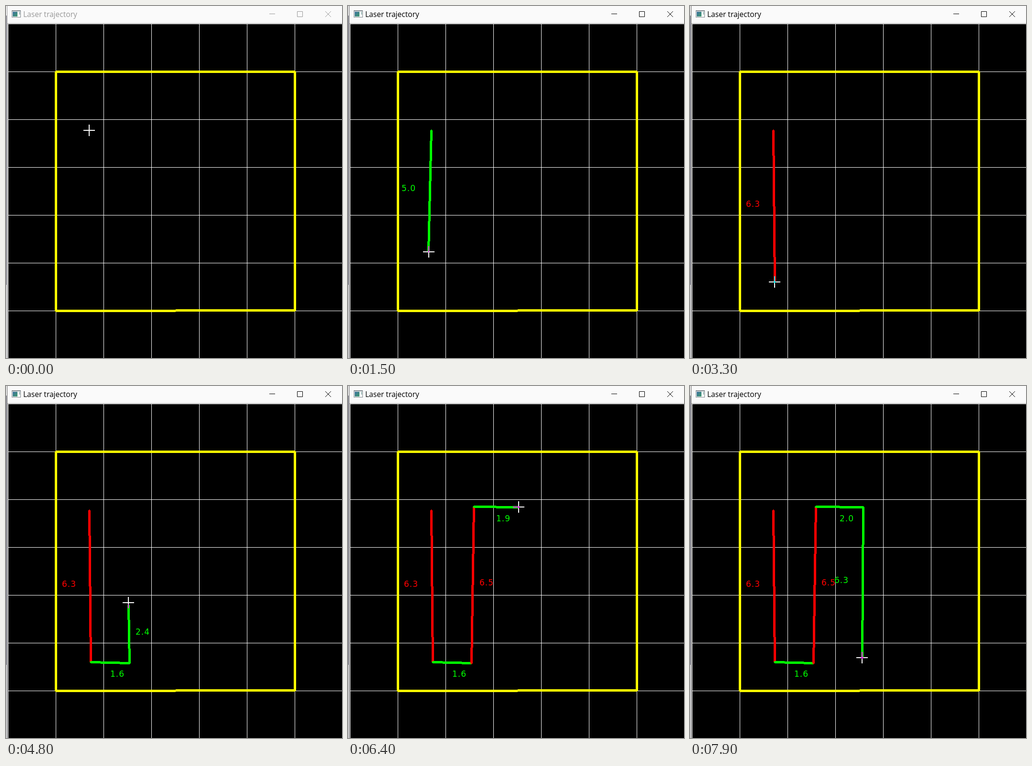
Recreate the animation shown at these times as an HTML page with a canvas. Size 703 px wide and 736 px high, loop 8 s.

```html
<!DOCTYPE html>
<html lang="en">
<head>
<meta charset="utf-8">
<title>Laser trajectory</title>
<style>
  html, body { margin: 0; width: 100%; height: 100%; overflow: hidden; background: #000; }
  canvas { display: block; }
</style>
</head>
<body>
<canvas id="stage" width="703" height="736"></canvas>
<script>
const ctx = document.getElementById('stage').getContext('2d');
const WIDTH = 703, HEIGHT = 736, LOOP = 8000, STEP = 100;
const LEFT = 4, TOP = 37, CELL = 100;
const LAG = 13;           // ms by which a stroke trails the pointer
const UNIT = 50;          // pixels per unit of length in the labels
const HOME = [174, 260];
const GREEN = '#00ff00', RED = '#ff0000', YELLOW = '#ffff00';

// One movement of the hand; sway is how far it bulges sideways on the way
const leg = (start, end, x, y, sway = 0) => ({ start, end, to: [x, y], sway });

// flips: times at which a stroke switches between green and red
const strokes = [
  {
    legs: [leg(500, 1060, 173, 392, 16), leg(1060, 1800, 176, 550, -10), leg(2900, 3300, 177, 577)],
    flips: [2100, 2500, 3000]
  },
  { legs: [leg(3600, 4200, 258, 579)], flips: [] },
  { legs: [leg(4500, 5670, 263, 252, -4)], flips: [5200] },
  { legs: [leg(5900, 6500, 362, 253)], flips: [] },
  { legs: [leg(6830, 7900, 360, 568, 17)], flips: [] }
];
const legs = strokes.flatMap(stroke => stroke.legs);

const easeOut = k => 1 - (1 - k) ** 1.65;

function pointer(t) {
  let from = HOME;
  for (const { start, end, to, sway } of legs) {
    if (t <= start) break;
    if (t < end) {
      const k = easeOut((t - start) / (end - start));
      const x = from[0] + (to[0] - from[0]) * k + sway * Math.sin(Math.PI * k);
      const y = from[1] + (to[1] - from[1]) * k;
      return [Math.round(x), Math.round(y)];
    }
    from = to;
  }
  return from;
}

function rect(color, x, y, w, h) {
  ctx.fillStyle = color;
  ctx.fillRect(x, y, w, h);
}

// Five pixels wide, stepped instead of smoothed, with rounded ends
function thickLine([x0, y0], [x1, y1], color) {
  const dx = x1 - x0, dy = y1 - y0;
  const upright = Math.abs(dy) > Math.abs(dx);
  const n = Math.max(Math.abs(dx), Math.abs(dy), 1);
  for (let i = 0; i <= n; i++) {
    const x = Math.round(x0 + dx * i / n), y = Math.round(y0 + dy * i / n);
    if (upright) rect(color, x - 2, y, 5, 1);
    else rect(color, x, y - 2, 1, 5);
  }
  for (const [x, y] of [[x0, y0], [x1, y1]]) {
    rect(color, x - 1, y - 1, 3, 3);
    rect(color, x, y - 2, 1, 5);
    rect(color, x - 2, y, 5, 1);
  }
}

function drawIcon(x, y) {
  rect('#7f868c', x, y, 19, 15);
  rect('#fff', x + 1, y + 2, 17, 12);
  const screen = ctx.createLinearGradient(x + 2, y + 3, x + 12, y + 13);
  screen.addColorStop(0, '#3c6ea0');
  screen.addColorStop(1, '#3f9a6c');
  rect(screen, x + 2, y + 3, 10, 10);
  rect('#4f8580', x + 16, y + 3, 1, 6);
}

function drawButtons(color) {
  ctx.strokeStyle = color;
  ctx.lineWidth = 1;
  ctx.beginPath();
  ctx.moveTo(551, 16.5);
  ctx.lineTo(563, 16.5);
  ctx.rect(609.5, 11.5, 11, 11);
  ctx.moveTo(668, 11);
  ctx.lineTo(680, 23);
  ctx.moveTo(680, 11);
  ctx.lineTo(668, 23);
  ctx.stroke();
}

function drawWindow(active) {
  const ink = active ? '#000' : '#999';
  rect('#000', 0, 0, WIDTH, HEIGHT);
  rect('#fafafa', 0, 0, WIDTH, TOP - 1);

  // Strip of desktop and window edge on the left
  rect('#f0f0f0', 0, 0, LEFT, HEIGHT);
  rect('#686878', 0, 20, 1, 563);
  rect('#c8c8cc', 1, 20, 1, HEIGHT);
  rect(active ? '#707070' : '#aaa', 2, 0, 1, HEIGHT);
  rect('#a0a0a0', LEFT - 1, TOP - 1, 1, HEIGHT);
  rect('#a0a0a0', LEFT - 1, TOP - 1, WIDTH, 1);

  drawIcon(12, 9);
  drawButtons(ink);
  ctx.fillStyle = ink;
  ctx.font = '15.6px "Open Sans", "Noto Sans", sans-serif';
  ctx.letterSpacing = '0px';
  ctx.fillText('Laser trajectory', 36, 23);
}

function drawGrid() {
  for (let i = 0; i < 7; i++) {
    rect('#fff', LEFT + i * CELL, TOP, 1, HEIGHT);
    rect('#fff', LEFT, TOP + i * CELL, WIDTH, 1);
  }
  const left = LEFT + CELL, top = TOP + CELL, size = 5 * CELL;
  const right = left + size, bottom = top + size;
  thickLine([left, top], [right, top], YELLOW);
  thickLine([right, top], [right, bottom - 1], YELLOW);
  thickLine([right, bottom - 1], [left, bottom], YELLOW);
  thickLine([left, bottom], [left, top], YELLOW);
}

function drawLabel([x0, y0], [x1, y1], color) {
  const dx = x1 - x0, dy = y1 - y0;
  const flat = Math.abs(dx) > Math.abs(dy);
  const shiftX = flat ? 0 : dy > 0 ? -59 : 14;
  const shiftY = flat ? 30 : 1;
  ctx.fillStyle = color;
  ctx.font = '17px "DejaVu Sans", sans-serif';
  ctx.letterSpacing = '1px';
  ctx.fillText((Math.hypot(dx, dy) / UNIT).toFixed(1),
    Math.round(x0 + dx / 2) + shiftX, Math.round(y0 + dy / 2) + shiftY);
}

function drawStroke({ legs, flips }, t) {
  const { start } = legs[0], { end } = legs.at(-1);
  if (t <= start) return;
  const from = pointer(start);
  const to = pointer(t >= end ? end : t - LAG);
  const color = flips.filter(time => time <= t).length % 2 ? RED : GREEN;
  thickLine(from, to, color);
  drawLabel(from, to, color);
}

// The pointer inverts whatever lies below it
function drawPointer([x, y]) {
  ctx.globalCompositeOperation = 'difference';
  rect('#fff', x - 12, y - 1, 24, 2);
  rect('#fff', x - 1, y - 12, 2, 11);
  rect('#fff', x - 1, y + 1, 2, 11);
  ctx.globalCompositeOperation = 'source-over';
}

const origin = performance.now();

function frame() {
  const elapsed = (performance.now() - origin) % LOOP;
  const t = Math.floor(elapsed / STEP) * STEP;
  drawWindow(t >= 400);
  drawGrid();
  strokes.forEach(stroke => drawStroke(stroke, t));
  drawPointer(pointer(t));
  requestAnimationFrame(frame);
}
frame();
</script>
</body>
</html>
```
